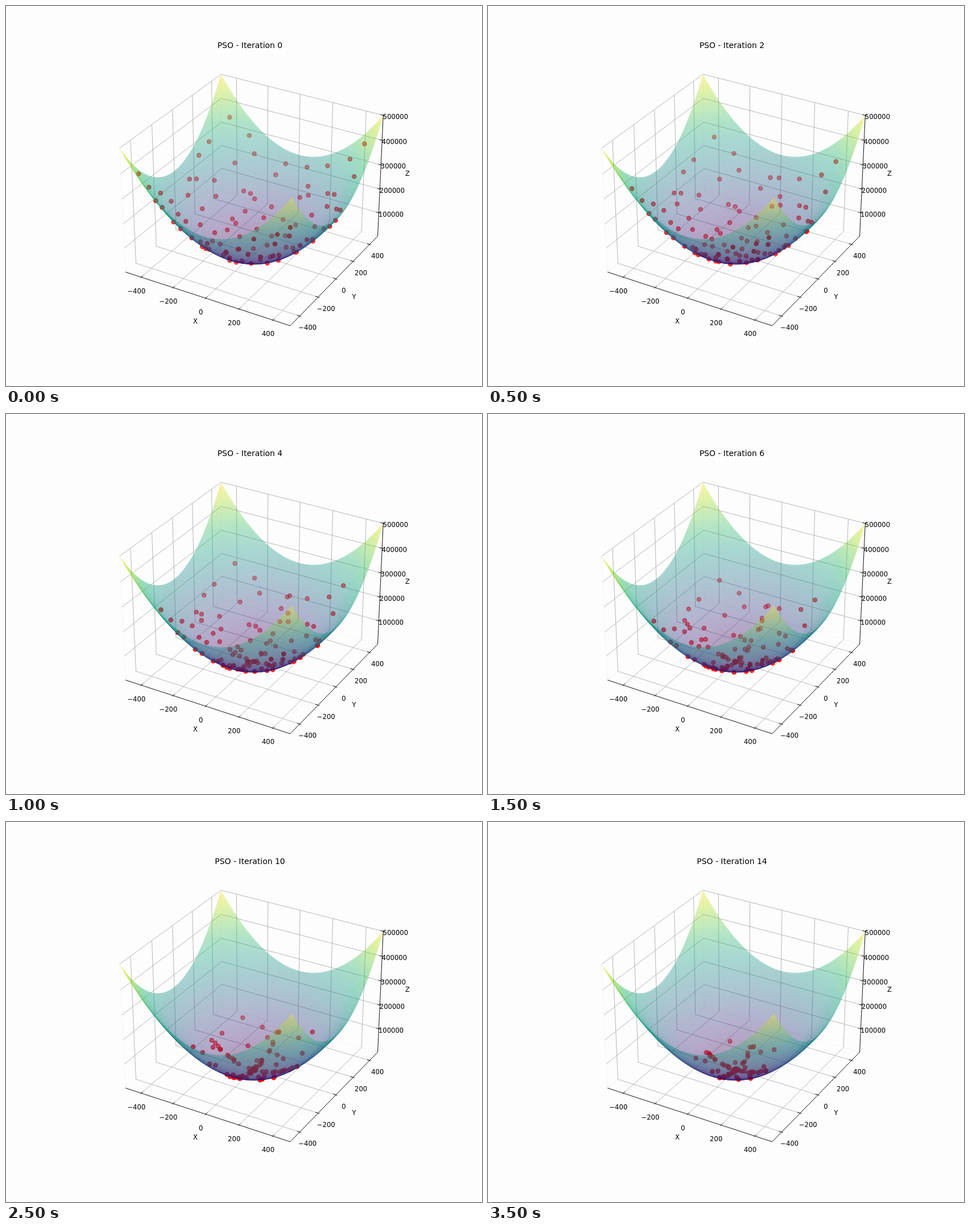
An HTML page with a canvas that plays this animation: 837 by 669 pixels, repeating every 3750 ms.

```html
<!DOCTYPE html>
<html lang="en">
<head>
<meta charset="utf-8">
<title>Particle swarm</title>
<style>
  html, body { margin: 0; width: 100%; height: 100%; overflow: hidden; background: #fdfdfd; }
  canvas { display: block; }
</style>
</head>
<body>
<canvas id="stage" width="837" height="669"></canvas>
<script>
const stage = document.getElementById('stage');
const ctx = stage.getContext('2d');
const STEP_MS = 250, STEPS = 15;
const SPEED = 0.04; // per step, in half-widths of the box
const SIDE = 0.59524, HEIGHT = 0.44643, COS = Math.sqrt(3) / 2;
const ORIGIN = { x: 435.94, y: 330.89 }, SCALE = { x: 2787, y: 2784.5 };

// a, b run over -1..1 on the floor, h over 0..1 upwards.
function project(a, b, h) {
  const x = SIDE * a, y = SIDE * b, z = HEIGHT * (2 * h - 1);
  const w = 10 - (COS / 2 * x - 0.75 * y + z / 2);
  return {
    x: ORIGIN.x + SCALE.x * (COS * x + y / 2) / w,
    y: ORIGIN.y - SCALE.y * (-x / 4 + COS / 2 * y + COS * z) / w,
    w
  };
}

const bowl = (a, b) => (a * a + b * b) / 2;

let seed = 7;
function random() {
  seed = (seed * 16807) % 2147483647;
  return seed / 2147483647;
}

// One particle at a random place in each cell of a 10 by 10 floor grid.
const scatter = cell => 0.94 * ((cell + random()) / 5 - 1);
const swarm = Array.from({ length: 100 }, (_, n) => ({
  a: scatter(n % 10),
  b: scatter(Math.floor(n / 10)),
  rest: 0.015 * random()
}));

// Each coordinate heads for zero at constant speed, then stays near it.
function advance(v, step, rest) {
  const size = Math.abs(v);
  return Math.sign(v) * Math.max(size - SPEED * step, Math.min(size, rest));
}

const VIRIDIS = [
  [68, 1, 84], [72, 40, 120], [62, 74, 137], [49, 104, 142], [38, 130, 142],
  [31, 158, 137], [53, 183, 121], [109, 205, 89], [180, 222, 44], [253, 231, 37]
];
function viridis(t, alpha) {
  const f = t * (VIRIDIS.length - 1);
  const i = Math.min(Math.floor(f), VIRIDIS.length - 2);
  const mix = VIRIDIS[i].map((c, n) => Math.round(c + (VIRIDIS[i + 1][n] - c) * (f - i)));
  return `rgba(${mix}, ${alpha})`;
}

function line(color, ...points) {
  ctx.strokeStyle = color;
  ctx.lineWidth = 0.93;
  ctx.beginPath();
  for (const p of points) {
    const s = project(...p);
    ctx.lineTo(s.x, s.y);
  }
  ctx.stroke();
}

function label(text, x, y, size = 11.62) {
  ctx.font = `${size}px "DejaVu Sans", sans-serif`;
  ctx.textAlign = 'center';
  ctx.fillStyle = '#000';
  ctx.fillText(text, x, y);
}

function tickLabel(value, at, dx, dy) {
  const s = project(...at);
  label(String(value).replace('-', '\u2212'), s.x + dx, s.y + dy + 4.2);
}

const floorTicks = [-400, -200, 0, 200, 400];
const heightTicks = [1, 2, 3, 4, 5];
const IN = 0.032, OUT = 0.016;

function drawAxes() {
  const pane = 'rgba(235, 235, 235, 0.5)', grid = '#b0b0b0', ink = '#000';
  line(pane, [-1, -1, 1], [-1, -1, 0], [-1, 1, 0], [1, 1, 0]);
  line(pane, [-1, 1, 0], [-1, 1, 1]);

  for (const v of floorTicks) {
    const t = v / 500;
    line(grid, [t, -1, 0], [t, 1, 0], [t, 1, 1]);
    line(grid, [1, t, 0], [-1, t, 0], [-1, t, 1]);
  }
  for (const n of heightTicks) line(grid, [-1, -1, n / 5], [-1, 1, n / 5], [1, 1, n / 5]);

  line(ink, [-1, -1, 0], [1, -1, 0]);
  line(ink, [1, -1, 0], [1, 1, 0]);
  line(ink, [1, 1, 0], [1, 1, 1]);

  for (const v of floorTicks) {
    const t = v / 500;
    line(ink, [t, -1 + IN, 0], [t, -1 - OUT, 0]);
    line(ink, [1 - IN, t, 0], [1 + OUT, t, 0]);
  }
  for (const n of heightTicks) line(ink, [1 - IN, 1, n / 5], [1 + OUT, 1, n / 5]);
}

function drawLabels(step) {
  for (const v of floorTicks) {
    tickLabel(v, [v / 500, -1, 0], -8.4, 24.2);
    tickLabel(v, [1, v / 500, 0], 13.9, 20);
  }
  for (const n of heightTicks) tickLabel(n * 100000, [1, 1, n / 5], 21.6, 2.3);
  label('X', 333, 559.3);
  label('Y', 612, 516.3);
  label('Z', 706, 299.3);
  label(`PSO - Iteration ${step}`, 428.96, 73.5, 13.95);
}

function drawSwarm(step) {
  const dots = swarm.map(p => {
    const a = advance(p.a, step, p.rest), b = advance(p.b, step, p.rest);
    const s = project(a, b, bowl(a, b));
    return { x: (s.x - ORIGIN.x) / SCALE.x, y: (s.y - ORIGIN.y) / SCALE.y, depth: -10 / s.w, s };
  });
  const span = key => {
    const values = dots.map(d => d[key]);
    return Math.max(...values) - Math.min(...values);
  };
  const reach = Math.hypot(span('x'), span('y'), span('depth'));
  const nearest = Math.min(...dots.map(d => d.depth));

  dots.sort((p, q) => q.depth - p.depth);
  ctx.lineWidth = 1.74;
  for (const { s, depth } of dots) {
    const alpha = Math.max(0.3, 1 - (depth - nearest) / reach);
    ctx.fillStyle = ctx.strokeStyle = `rgba(255, 0, 0, ${alpha})`;
    ctx.beginPath();
    ctx.arc(s.x, s.y, 3.49, 0, 2 * Math.PI);
    ctx.fill();
    ctx.stroke();
  }
}

// The bowl never changes: a fine translucent mesh, painted once from back to front.
function paintBowl() {
  const layer = document.createElement('canvas');
  layer.width = stage.width;
  layer.height = stage.height;
  const g = layer.getContext('2d');
  const cells = 200, size = 2 / cells;
  const corner = (a, b) => project(a, b, bowl(a, b));
  g.lineWidth = 0.22;
  for (let j = cells - 1; j >= 0; j--) {
    for (let i = 0; i < cells; i++) {
      const a = i * size - 1, b = j * size - 1;
      g.fillStyle = g.strokeStyle = viridis(bowl(a + size / 2, b + size / 2), 0.32);
      g.beginPath();
      for (const s of [corner(a, b), corner(a + size, b), corner(a + size, b + size), corner(a, b + size)]) {
        g.lineTo(s.x, s.y);
      }
      g.closePath();
      g.fill();
      g.stroke();
    }
  }
  return layer;
}
const bowlLayer = paintBowl();

function draw(step) {
  ctx.fillStyle = '#fdfdfd';
  ctx.fillRect(0, 0, stage.width, stage.height);
  drawAxes();
  drawSwarm(step);
  ctx.drawImage(bowlLayer, 0, 0);
  drawLabels(step);
}

const start = performance.now();
let shown = -1;
function tick() {
  const step = Math.floor((performance.now() - start) / STEP_MS) % STEPS;
  if (step !== shown) draw(shown = step);
  requestAnimationFrame(tick);
}
tick();
</script>
</body>
</html>
```
